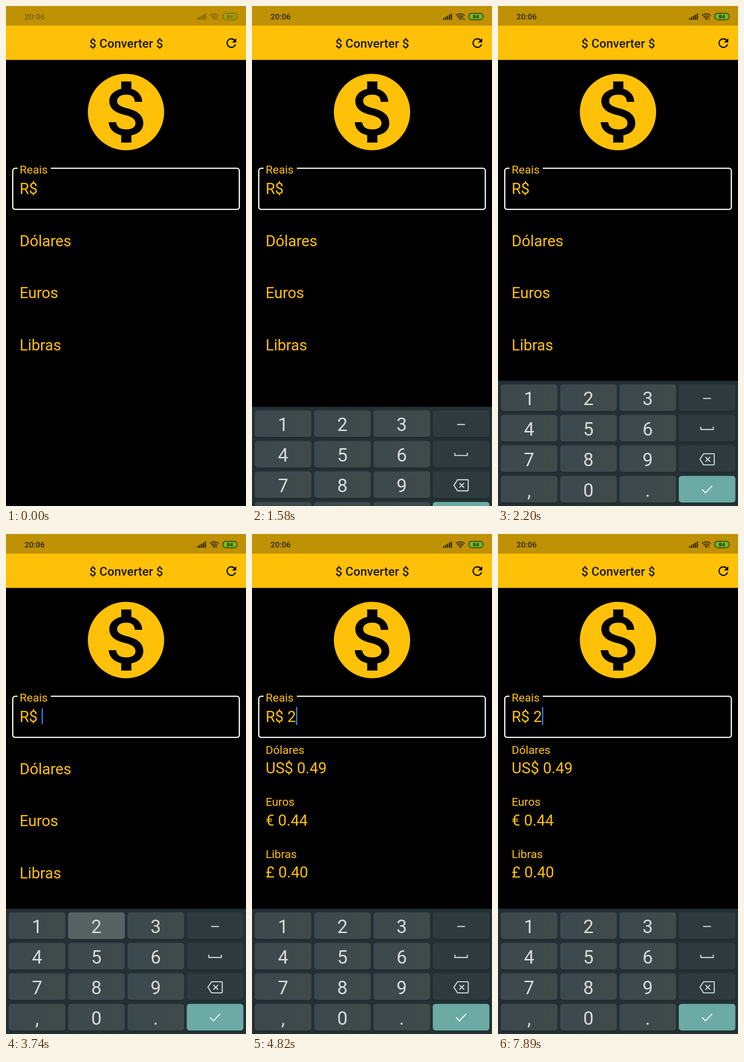
Recreate the animation shown at these times as an HTML page. Size 519 px wide and 1080 px high, loop 8000 ms.

```html
<!DOCTYPE html>
<html lang="pt">
<head>
<meta charset="utf-8">
<title>Converter</title>
<style>
  html, body { margin: 0; width: 100%; height: 100%; overflow: hidden; background: #000; }
  svg { display: block; width: 519px; height: 1080px; font-family: Roboto, sans-serif; }
  text { white-space: pre; }
  .field { fill: #ffc107; font-size: 33px; }
  .key { fill: #d6dbdc; font-size: 40px; text-anchor: middle; }
  .icon { fill: none; stroke: #cdd3d5; stroke-width: 2.4; }
</style>
</head>
<body>
<svg id="stage" viewBox="0 0 519 1080" xmlns="http://www.w3.org/2000/svg">
  <defs>
    <linearGradient id="board" x1="0" y1="0" x2="1" y2="0">
      <stop offset="0" stop-color="#232f35"/><stop offset="1" stop-color="#233034"/>
    </linearGradient>
    <linearGradient id="digit" x1="0" y1="0" x2="1" y2="0">
      <stop offset="0" stop-color="#3b484d"/><stop offset="1" stop-color="#404a4a"/>
    </linearGradient>
  </defs>

  <rect width="519" height="1080" fill="#000"/>
  <rect width="519" height="116.5" fill="#ffc107"/>
  <rect width="519" height="42.5" fill="#bf9104"/>

  <g id="status" fill="#2b2103">
    <text x="40" y="29" font-size="17" font-weight="500" letter-spacing=".15">20:06</text>
    <g id="bars"></g>
    <g fill="none" stroke="#2b2103" stroke-width="2">
      <path d="M441 20.8Q450.5 12.6 460 20.8"/>
      <path d="M444 24Q450.5 18.4 457 24"/>
      <path d="M447 27Q450.5 24 454 27"/>
    </g>
    <circle cx="450.5" cy="28.8" r="1.5"/>
    <path id="down" d="M456.2 26v4" fill="none" stroke="#2b2103" stroke-width="1.3"/>
    <path id="up" d="M459 27v4" fill="none" stroke="#2b2103" stroke-width="1.3"/>
    <rect x="468.7" y="15.7" width="31" height="14" rx="6.5" fill="#6abd1e" stroke="#2b2103" stroke-width="1.5"/>
    <text x="484.2" y="27" font-size="11.5" font-weight="700" text-anchor="middle">84</text>
  </g>

  <text x="260" y="90" font-size="26.4" font-weight="500" text-anchor="middle" fill="#211901">$ Converter $</text>
  <path transform="translate(471.5 64.2) scale(1.3216)" fill="#0c0900" d="M17.65 6.35C16.2 4.9 14.21 4 12 4c-4.42 0-7.99 3.58-7.99 8s3.57 8 7.99 8c3.73 0 6.84-2.55 7.73-6h-2.08c-.82 2.33-3.04 4-5.65 4-3.31 0-6-2.69-6-6s2.69-6 6-6c1.66 0 3.14.69 4.22 1.78L13 11h7V4z"/>

  <circle cx="259.5" cy="229" r="82.5" fill="#ffc107"/>
  <path transform="translate(160.4 129.9) scale(8.26)" fill="#000" d="M13.41 18.09V20h-2.67v-1.93c-1.71-.36-3.16-1.46-3.27-3.4h1.96c.1 1.05.82 1.87 2.65 1.87 1.96 0 2.4-.98 2.4-1.59 0-.83-.44-1.61-2.67-2.14-2.48-.6-4.18-1.62-4.18-3.67 0-1.72 1.39-2.84 3.11-3.21V4h2.67v1.95c1.86.45 2.79 1.86 2.85 3.39H14.3c-.05-1.11-.64-1.87-2.22-1.87-1.5 0-2.4.68-2.4 1.64 0 .84.65 1.39 2.67 1.91s4.18 1.39 4.18 3.91c-.02 1.83-1.38 2.83-3.12 3.16z"/>

  <path fill="none" stroke="#fff" stroke-width="2.6" d="M25 350.5H19.9a5.3 5.3 0 0 0-5.3 5.3V434a5.3 5.3 0 0 0 5.3 5.3H499.3a5.3 5.3 0 0 0 5.3-5.3V355.8a5.3 5.3 0 0 0-5.3-5.3H97"/>
  <text class="field" x="29.5" y="362.3" style="font-size:24.75px">Reais</text>
  <text class="field" x="29.5" y="405.5">R$ <tspan id="typed">2</tspan></text>
  <rect id="cursor" width="2.5" fill="#4285f4"/>
  <g id="rows"></g>
  <g id="keyboard"><rect y="809.5" width="519" height="400" fill="url(#board)"/></g>
</svg>
<script>
const LOOP = 8000, TYPED_AT = 3820;
const $ = id => document.getElementById(id);

function add(parent, tag, attrs, text) {
  const el = document.createElementNS('http://www.w3.org/2000/svg', tag);
  for (const name in attrs) el.setAttribute(name, attrs[name]);
  if (text !== undefined) el.textContent = text;
  parent.appendChild(el);
  return el;
}

for (let i = 0; i < 5; i++) {
  const h = 4 + i * 2.5;
  add($('bars'), 'rect', { x: 413 + i * 4.2, y: 30 - h, width: 2.7, height: h, rx: 1 });
}

// Result rows: a floating label above a prefix and a value.
const rows = [['Dólares', 'US$ ', '0.49'], ['Euros', '€ ', '0.44'], ['Libras', '£ ', '0.40']]
  .map(([name, sign, amount], i) => {
    const y = i * 112.4;
    const label = add($('rows'), 'text', { class: 'field' }, name);
    const line = add($('rows'), 'text', { class: 'field', x: 29.5, y: 517.4 + y });
    const prefix = add(line, 'tspan', {}, sign);
    add(line, 'tspan', {}, amount);
    return { label, line, prefix, y };
  });

const board = $('keyboard');
let pressed;
['123-', '456_', '789<', ',0.='].forEach((keys, r) => [...keys].forEach((key, c) => {
  const x = 6 + c * 128.3, y = 817.3 + r * 65.9, mid = x + 61.2, cy = y + 29;
  const fill = c < 3 ? 'url(#digit)' : r < 3 ? '#2f3a3f' : '#6babA4';
  const box = { x, y, width: 122.5, height: 57.5, rx: 6 };
  add(board, 'rect', { ...box, y: y + 1.5, fill: '#1a2428' });
  add(board, 'rect', { ...box, fill });
  if (key === '2') pressed = add(board, 'rect', { ...box, fill: '#566162' });
  if (c < 3) add(board, 'text', { class: 'key', x: mid, y: y + 44.7 }, key);
  else {
    const shape = [
      'M-8.5 1.5h17',
      'M-13.5-3.5v6h27v-6',
      'M-15.5 1L-7.5-11H14a1.5 1.5 0 0 1 1.5 1.5V11.5A1.5 1.5 0 0 1 14 13H-7.5zM-3.5-4l10 10M6.5-4l-10 10',
      'M-11 0l7.5 7.5L11-7.5'
    ][r];
    add(board, 'path', { class: 'icon', d: shape, transform: `translate(${mid} ${cy})`,
      style: r === 3 ? 'stroke:#f2f7f6' : '' });
  }
}));

const clamp = v => Math.max(0, Math.min(1, v));
const ramp = (t, from, to) => clamp((t - from) / (to - from));
const show = (el, on) => el.setAttribute('visibility', on ? 'visible' : 'hidden');

// Cubic Bezier (0.4, 0, 0.2, 1), solved by bisection.
function ease(x) {
  let lo = 0, hi = 1;
  for (let i = 0; i < 20; i++) {
    const s = (lo + hi) / 2;
    const bx = 1.2 * s * (1 - s) ** 2 + .6 * s * s * (1 - s) + s ** 3;
    if (bx < x) lo = s; else hi = s;
  }
  return x <= 0 ? 0 : x >= 1 ? 1 : 3 * lo * lo * (1 - lo) + lo ** 3;
}

const cursorOn = [[660, 1160], [1660, 2160], [2660, 3160], [3650, 4320],
  [4820, 5310], [5810, 6310], [6810, 7310], [7810, LOOP]];
const traffic = [[0, 3], [2120, 1], [4240, 0], [5230, 3], [6230, 0], [7220, 1]];

function draw(t) {
  $('status').setAttribute('opacity', .42 + .58 * ramp(t, 340, 620));
  const flow = traffic.filter(([at]) => t >= at).pop()[1];
  show($('down'), flow & 1);
  show($('up'), flow & 2);

  const typed = t >= TYPED_AT;
  show($('typed'), typed);
  show($('cursor'), cursorOn.some(([a, b]) => t >= a && t < b));
  $('cursor').setAttribute('x', typed ? 95.3 : 77.2);
  $('cursor').setAttribute('y', typed ? 373.5 : 376.5);
  $('cursor').setAttribute('height', typed ? 39 : 34.5);

  const up = ease(ramp(t, TYPED_AT, TYPED_AT + 200));
  for (const { label, line, prefix, y } of rows) {
    const base = 518.9 + (474.8 - 518.9) * up + y;
    label.setAttribute('transform', `translate(29.5 ${base}) scale(${1 - .25 * up})`);
    show(line, typed);
    prefix.setAttribute('fill-opacity', up);
  }

  const slide = 271 * (1 - ramp(t, 1500, 1800)) ** 5;
  show(board, t >= 1540);
  board.setAttribute('transform', `translate(0 ${slide})`);
  pressed.setAttribute('opacity', ramp(t, 3680, 3735) * (1 - ramp(t, 3800, 3920)));
}

function tick() {
  draw(performance.now() % LOOP);
  requestAnimationFrame(tick);
}
tick();
</script>
</body>
</html>
```
